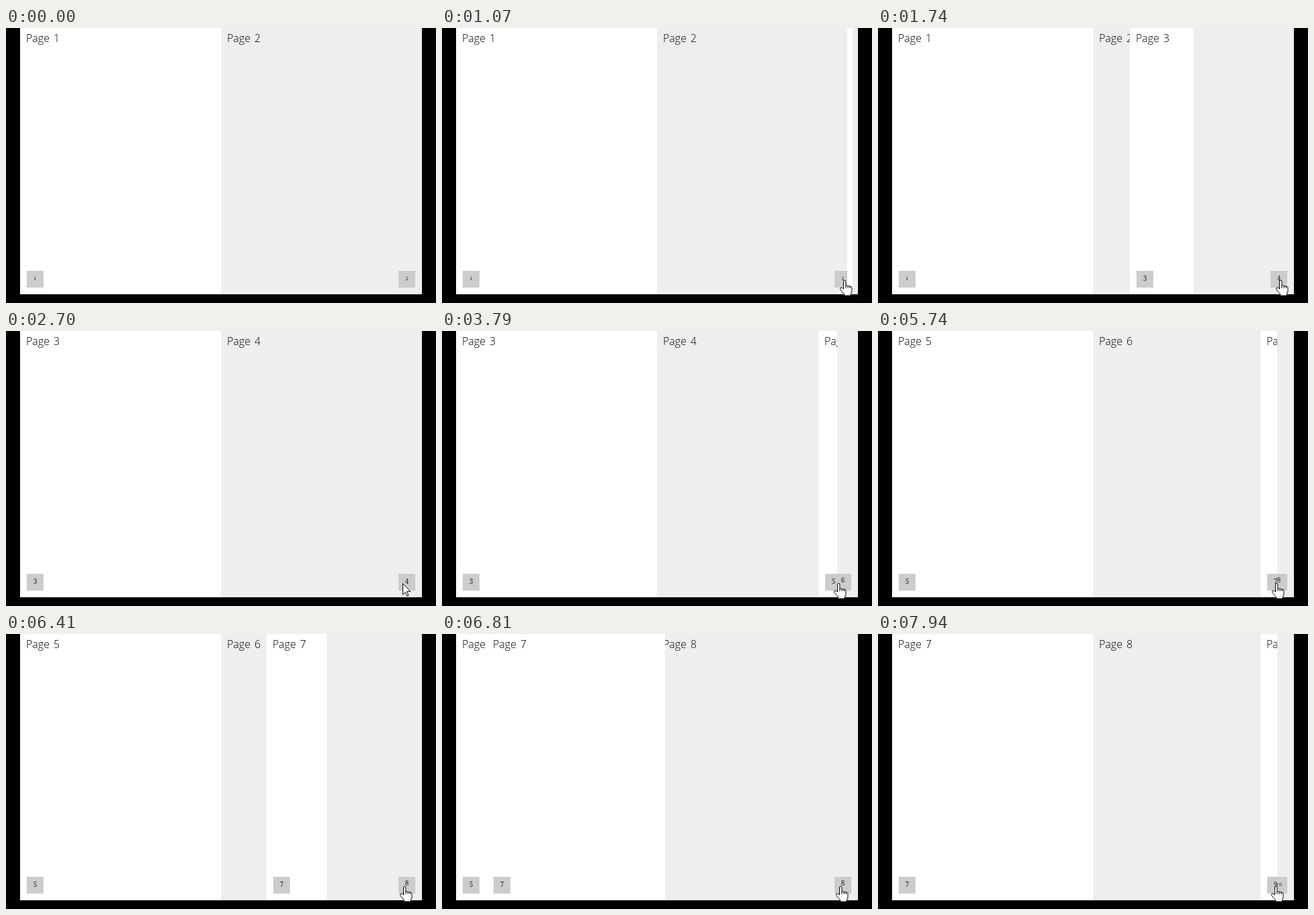
Recreate the animation shown at these times as an HTML page with a canvas. Size 642 by 410 pixels, loop 8000 ms.

```html
<!DOCTYPE html>
<html lang="en">
<head>
<meta charset="utf-8">
<title>Page flip</title>
<style>
  html, body { margin: 0; width: 642px; height: 410px; overflow: hidden; background: #000; }
  canvas { display: block; }
</style>
</head>
<body>
<canvas id="stage" width="642" height="410"></canvas>
<script>
const ctx = document.getElementById('stage').getContext('2d');
const LOOP = 8000, LEFT = 21, PAGE = 300, HEIGHT = 397;

// Each spread: the corner peeks on hover, then a click turns the page.
const HOVER_TIME = 500, HALF_TURN = 500;
const hovers = [880, 2960, 5240, 7440];
const turns = [1368, 3709, 6050, Infinity];

// Pointer positions: time, x, y
const pointer = [
  [600, 606, 402], [850, 601, 376], [2640, 601, 376], [2700, 592, 376],
  [4740, 592, 376], [5320, 595, 376], [7300, 595, 376], [7400, 594, 376]
];
const arrow = new Path2D('M.5 .5V17L4.2 13.4L6.8 19.2L9 18.2L6.5 12.4H11.8Z');
const hand = new Path2D('M-1.5 13V2a1.7 1.7 0 0 1 3.4 0V8.5q2-1.5 3.2.5q2-1.2 3.2.7q2.2-.8 2.7 1.2V16q0 2-1.6 4V23H-.5V20.5Q-3 18-6.5 13.5Q-7 11.5-4.8 11Q-3.5 11-1.5 13Z');

const clamp = v => Math.max(0, Math.min(1, v));
const mix = (a, b, p) => a + (b - a) * p;
const easeIn = p => p * p;
const easeOut = p => p * (2 - p);
const swing = p => (1 - Math.cos(Math.PI * p)) / 2;

// Old-style figures: small 0-2, descending 3, 4, 5, 7 and 9.
function drawNumber(n, center) {
  const digits = [...String(n)];
  digits.forEach((d, i) => {
    const small = d < 3;
    ctx.font = `${small ? 7 : 10}px "Noto Serif", serif`;
    const baseline = small ? 376 : d === '6' || d === '8' ? 375 : 377;
    ctx.fillText(d, center + (i - (digits.length - 1) / 2) * 5, baseline);
  });
}

function drawPage(n, x, clipX, clipWidth) {
  if (clipWidth <= 0) return;
  const even = n % 2 === 0;
  const boxX = x + (even ? 265 : 10);
  ctx.save();
  ctx.beginPath();
  ctx.rect(clipX, 0, clipWidth, HEIGHT);
  ctx.clip();
  ctx.fillStyle = even ? '#eee' : '#fff';
  ctx.fillRect(x, 0, PAGE, HEIGHT);
  ctx.fillStyle = '#ccc';
  ctx.fillRect(boxX, 362, 25, 25);
  ctx.fillStyle = '#000';
  ctx.textAlign = 'left';
  ctx.font = '300 16px "Open Sans", sans-serif';
  ctx.fillText('Page', x + 9, 21);
  ctx.fillText(n, x + (n > 9 ? 45 : 50), 21);
  ctx.fillStyle = '#222';
  ctx.textAlign = 'center';
  drawNumber(n, boxX + 12.5);
  ctx.restore();
}

// Left offset and width of the turning page.
function foldAt(t, spread) {
  const turn = t - turns[spread];
  if (turn >= HALF_TURN) {
    const p = easeOut(clamp((turn - HALF_TURN) / HALF_TURN));
    return [mix(200, 0, p), mix(150, 300, p)];
  }
  if (turn > 0) {
    const p = easeIn(turn / HALF_TURN);
    return [mix(550, 200, p), mix(25, 150, p)];
  }
  const p = swing(clamp((t - hovers[spread]) / HOVER_TIME));
  return [mix(600, 550, p), 25 * p];
}

function drawPointer(t, isHand) {
  if (t < pointer[0][0]) return;
  const next = pointer.findIndex(k => k[0] > t);
  const b = next < 0 ? pointer[pointer.length - 1] : pointer[next];
  const a = next < 0 ? b : pointer[next - 1];
  const p = a === b ? 1 : (t - a[0]) / (b[0] - a[0]);
  const shape = isHand ? hand : arrow;
  ctx.save();
  ctx.translate(Math.round(mix(a[1], b[1], p)), Math.round(mix(a[2], b[2], p)));
  ctx.fillStyle = '#fff';
  ctx.strokeStyle = '#000';
  ctx.lineWidth = 1;
  ctx.fill(shape);
  ctx.stroke(shape);
  if (isHand) {
    ctx.beginPath();
    for (const x of [1.9, 5.1, 8.3]) {
      ctx.moveTo(x, 8.5);
      ctx.lineTo(x, 12);
    }
    ctx.stroke();
  }
  ctx.restore();
}

function draw(t) {
  const spread = turns.findIndex(start => t < start + 2 * HALF_TURN);
  const first = spread * 2 + 1;
  const [offset, width] = foldAt(t, spread).map(Math.round);
  const foldX = LEFT + offset, split = foldX + width;
  const middle = LEFT + PAGE, right = middle + PAGE;
  ctx.fillStyle = '#000';
  ctx.fillRect(0, 0, 642, 410);
  drawPage(first, LEFT, LEFT, PAGE);
  drawPage(first + 1, middle, middle, PAGE);
  drawPage(first + 3, middle, split, right - split);
  drawPage(first + 2, foldX, foldX, width);
  drawPointer(t, t >= hovers[spread]);
}

const start = performance.now();
function frame() {
  draw((performance.now() - start) % LOOP);
  requestAnimationFrame(frame);
}
frame();
</script>
</body>
</html>
```
